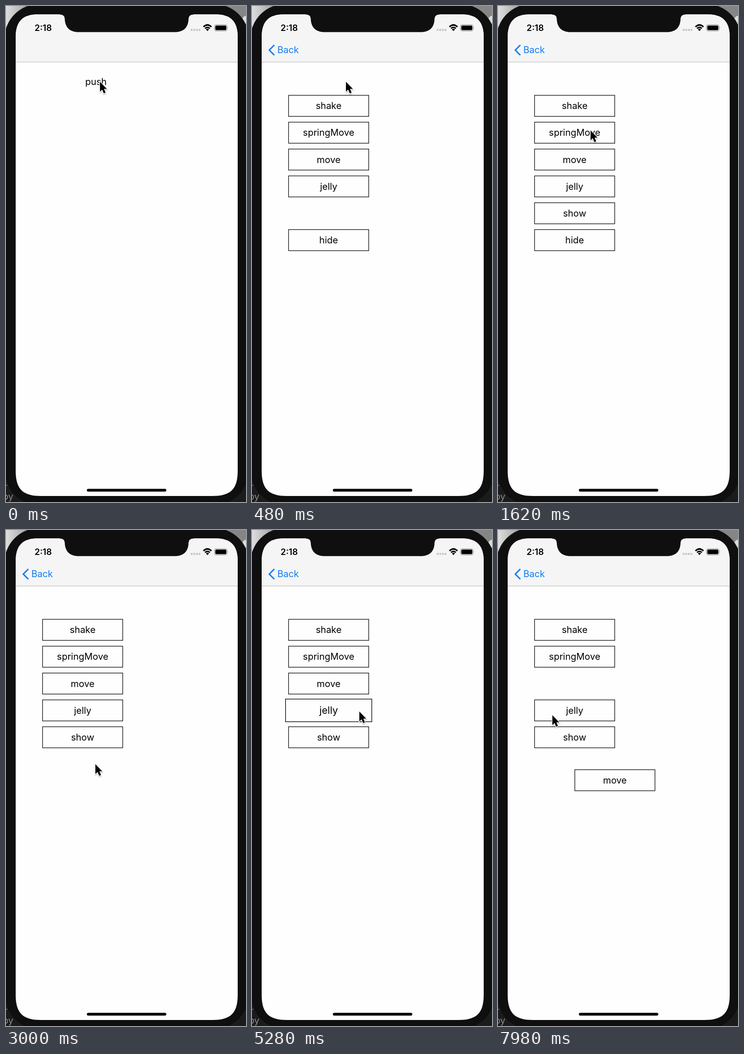
An HTML page for the animation above (8 s loop, 521x1074 px).

```html
<!DOCTYPE html>
<html lang="en">
<head>
<meta charset="utf-8">
<title>Button animations</title>
<style>
  html, body { margin: 0; width: 100%; height: 100%; overflow: hidden; background: #171717; }
  svg { display: block; width: 521px; height: 1074px; }
  text { font: 20px Inter, Roboto, sans-serif; }
  .label { text-anchor: middle; }
  .box { fill: none; stroke: #111; stroke-width: 1.35; }
</style>
</head>
<body>
<svg viewBox="0 0 521 1074">
  <defs>
    <linearGradient id="desk">
      <stop offset="0" stop-color="#dedede"/>
      <stop offset=".1" stop-color="#9b9b9b"/>
      <stop offset="1" stop-color="#858585"/>
    </linearGradient>
    <clipPath id="screen"><path id="screenShape" d="M21 68C21 33 36 18 71 18H453C488 18 503 33 503 68V1006C503 1046 488 1061 448 1061H76C36 1061 21 1046 21 1006Z"/></clipPath>
    <filter id="shadow" x="-50%" y="-50%" width="200%" height="200%">
      <feDropShadow dx="0" dy="1.5" stdDeviation="1.2" flood-opacity=".35"/>
    </filter>
  </defs>

  <rect width="521" height="1074" fill="#1b1b1b"/>
  <rect width="521" height="80" fill="url(#desk)"/>
  <circle cx="522" cy="30" r="9" fill="#ddd"/>
  <text x="-7" y="1069" fill="#8c8c8c">by</text>
  <path d="M0 1038H3" stroke="#777" stroke-width="1.5"/>
  <rect x="-3" y="-4" width="530" height="1086" rx="75" fill="#0f0f0f" stroke="#242424"/>

  <g clip-path="url(#screen)">
    <rect x="21" y="18" width="482" height="1043" fill="#fefefe"/>
    <rect id="dim" x="21" y="121" width="482" height="940" fill="#000a06"/>
    <rect id="seam" y="121" width="9" height="940" fill="#000" opacity=".012"/>
    <text id="push" class="label" y="171">push</text>
    <g id="page"></g>
    <rect x="21" y="18" width="482" height="103" fill="#f5f5f5"/>
    <path d="M21 121.3H503" stroke="#c3c3c3" stroke-width="1.2"/>
    <g id="back" fill="#117cf0">
      <path d="M48.5 84.5L37.5 95.5L48.5 106.5" fill="none" stroke="#117cf0" stroke-width="3"/>
      <text id="backText" y="102">Back</text>
    </g>
    <path d="M117 17V18.5Q127 18.5 127.5 27C128 46 138 56.5 158 56.5H366C386 56.5 396 46 396.3 27Q397 18.5 407 18.5V17Z" fill="#0f0f0f"/>
    <text x="62" y="54" style="font-weight:600;font-size:18.7px">2:18</text>
    <path d="M401 51.7H422" stroke="#c4c4c4" stroke-width="4" stroke-dasharray="4 1.7"/>
    <g fill="none" stroke="#000" stroke-width="3.1">
      <path d="M428.6 45.2Q437.3 36.8 446 45.2"/>
      <path d="M432 48.7Q437.3 43.8 442.6 48.7"/>
    </g>
    <path d="M433.9 50.7Q437.3 47.8 440.7 50.7L437.3 54.2Z"/>
    <rect x="452.5" y="40.5" width="27.5" height="13.4" rx="3.8" fill="none" stroke="#8b8b8b" stroke-width="1.1"/>
    <rect x="454.3" y="42.2" width="24" height="10" rx="2.3"/>
    <path d="M481.3 45V49.5Q483 47.2 481.3 45Z" fill="#888"/>
    <rect x="175.5" y="1045.5" width="172.5" height="6" rx="3"/>
  </g>

  <path id="cursor" d="M0 0V21.5L4.8 17L8.3 25.3L12.2 23.6L8.8 15.6H15Z" stroke="#fff" stroke-width="2.4" paint-order="stroke" filter="url(#shadow)"/>
</svg>

<script>
const LOOP = 8000, STEP = 60;
const BOX_W = 174, BOX_H = 45.6, CENTER_X = 166.4;
const PUSH_START = 40, PUSH_END = 480;
const $ = id => document.getElementById(id);
const clamp = x => Math.min(1, Math.max(0, x));
const smooth = x => x * x * (3 - 2 * x);
const shift = (el, x, y, s = 1) => el.setAttribute('transform', `translate(${x} ${y}) scale(${s})`);

function add(parent, tag, attrs) {
  const el = document.createElementNS('http://www.w3.org/2000/svg', tag);
  for (const key in attrs) el.setAttribute(key, attrs[key]);
  return parent.appendChild(el);
}

const buttons = {};
['shake', 'springMove', 'move', 'jelly', 'show', 'hide'].forEach((name, i) => {
  const group = add($('page'), 'g', {});
  const box = add(group, 'rect', { class: 'box' });
  const label = add(group, 'text', { class: 'label', y: 7 });
  label.textContent = name;
  buttons[name] = { group, box, label, y: 216.2 + i * 58.15 };
  resize(buttons[name], 1);
  shift(group, CENTER_X, buttons[name].y);
});

// Resizing changes the frame only; the title keeps its size.
function resize({ group, box, label }, s) {
  const w = BOX_W * s, h = BOX_H * s;
  for (const [key, value] of Object.entries({ x: -w / 2, y: -h / 2, width: w, height: h }))
    box.setAttribute(key, value);
  group.style.display = s > 0.01 ? '' : 'none';
  label.style.display = s > 0.25 ? '' : 'none';
}

// Time, x, y of the pointer tip.
const pointer = [
  [0, 204, 164], [1200, 204, 164], [2340, 194, 507], [3000, 194, 507],
  [3360, 208, 466], [3600, 225, 447], [4020, 228, 444], [4260, 240, 425],
  [4860, 233, 393], [5940, 233, 393], [6540, 120, 340], [7140, 120, 340],
  [7740, 118, 401], [LOOP, 118, 401]
];

function pointerAt(t) {
  const i = pointer.findIndex(p => p[0] > t);
  const [t0, x0, y0] = pointer[i - 1], [t1, x1, y1] = pointer[i];
  const k = smooth((t - t0) / (t1 - t0));
  return [x0 + (x1 - x0) * k, y0 + (y1 - y0) * k];
}

function pop(ms) {
  const s = Math.max(0, ms) / 1000;
  return 1 - Math.exp(-12.7 * s) * (Math.cos(15 * s) + 0.846 * Math.sin(15 * s));
}

function wobble(ms) {
  return ms < 0 ? 1 : 1 + 0.1 * Math.exp(-ms / 350) * Math.sin(ms * Math.PI / 200) * clamp((600 - ms) / 200);
}

function drawPush(t) {
  const u = Math.max(0, t - PUSH_START) * 0.0206;
  const p = 1 - (1 + u) * Math.exp(-u);
  const moving = t > PUSH_START && t < PUSH_END;
  const offset = 482 * (1 - p);
  shift($('page'), t < PUSH_END ? offset : 0, 0);
  $('push').setAttribute('x', 195.3 - 144 * p);
  $('push').style.display = t < PUSH_END ? '' : 'none';
  $('dim').setAttribute('opacity', moving ? 0.14 * p : 0);
  $('seam').setAttribute('x', 12 + offset);
  $('seam').style.display = moving ? '' : 'none';
  $('back').setAttribute('opacity', t < PUSH_END ? p ** 1.1 : 1);
  $('backText').setAttribute('x', 55 + (t < PUSH_END ? 65 * (1 - p) : 0));
}

function draw(t) {
  drawPush(t);
  const { show, hide, jelly, move } = buttons;
  resize(show, t < PUSH_END ? 0 : pop(t - (t < 3660 ? PUSH_END : 3660)));
  resize(hide, 1 - smooth(clamp((t - 2610) / 330)));
  shift(jelly.group, CENTER_X, jelly.y, wobble(t - 5190));
  const k = clamp((t - 6720) / 900);
  shift(move.group, CENTER_X + 87.3 * (1 - (1 - k) ** 2.07), move.y + 209.3 * k ** 1.73);
  shift($('cursor'), ...pointerAt(t));
}

const start = performance.now();
function tick() {
  const t = (performance.now() - start) % LOOP;
  draw(Math.floor(t / STEP) * STEP);
  requestAnimationFrame(tick);
}
tick();
</script>
</body>
</html>
```
